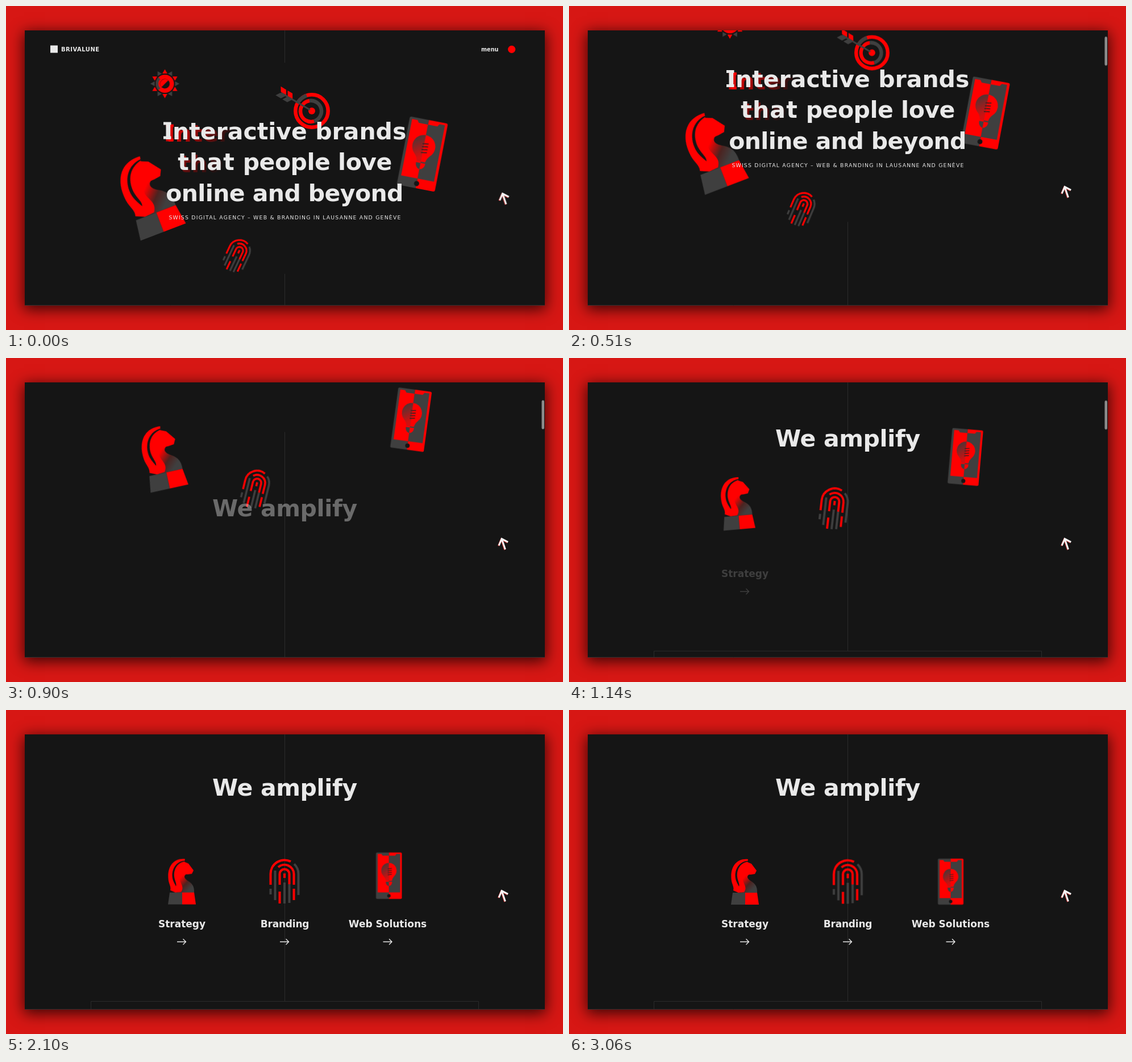
Write an HTML page that moves like this. It is 980x571 px and loops after 3090 ms.

```html
<!DOCTYPE html>
<html lang="en">
<head>
<meta charset="utf-8">
<title>Interactive brands</title>
<style>
  html, body { margin: 0; width: 100%; height: 100%; overflow: hidden; background: #d71714; }
  .card {
    position: absolute; left: 33px; top: 43px; width: 915px; height: 485px;
    background: #151515; box-shadow: 0 5px 24px 2px rgba(0, 0, 0, .72);
  }
  svg { position: absolute; left: 0; top: 0; display: block; }
  text { font-family: "DejaVu Sans", Verdana, sans-serif; font-weight: 700; fill: #e9e9e9; }
  .mid { text-anchor: middle; }
  .big { font-size: 41px; fill: #e9e9e9; }
  .sub { font-size: 9.3px; font-weight: 400; letter-spacing: 1.22px; }
  .label { font-size: 17px; }
  .ghost, .ghost text { fill: url(#ghost); }
  .rule { fill: none; stroke: #2b2b2b; }
  .red { fill: #f00; }
  .gray { fill: #3f3f3f; }
  .dark { fill: #151515; }
  .red-line { stroke: #f00; }
  .gray-line { stroke: #3f3f3f; }
  .line { fill: none; stroke-width: 4; }
  .ring { fill: none; stroke-width: 6.5; }

  .page, .icon, .drift, .title, .fade, .thumb, .bar, .cursor {
    animation: 3090ms linear infinite both;
  }

  .page { animation-name: scroll; }
  @keyframes scroll {
    0%, 9.71% { transform: translateY(0); animation-timing-function: cubic-bezier(.33, 0, .67, .62); }
    16.5% { transform: translateY(-91px); animation-timing-function: cubic-bezier(.33, .35, .67, .43); }
    23.3% { transform: translateY(-191px); animation-timing-function: cubic-bezier(.33, .47, .67, .98); }
    36.89% { transform: translateY(-447px); animation-timing-function: ease-out; }
    45%, 100% { transform: translateY(-450px); }
  }

  /* Each icon flies from its hero pose to its place above a label. */
  .icon { animation-name: fly; }
  @keyframes fly {
    0%, 9.71% { transform: var(--p0); animation-timing-function: cubic-bezier(.33, 0, .67, .33); }
    16.5% { transform: var(--p1); animation-timing-function: cubic-bezier(.33, .23, .67, .23); }
    23.3% { transform: var(--p2); animation-timing-function: cubic-bezier(.33, .18, .67, .83); }
    36.89% { transform: var(--p3); animation-timing-function: cubic-bezier(.33, .7, .67, .87); }
    49.51% { transform: var(--p4); animation-timing-function: cubic-bezier(.33, .7, .6, 1); }
    67.96% { transform: var(--p5); animation-timing-function: cubic-bezier(.2, .7, .5, 1); }
    99.03%, 100% { transform: var(--p6); }
  }
  .knight {
    --p0: translate(252.5px, 333px) rotate(-21deg) scale(1.74);
    --p1: translate(254.5px, 346px) rotate(-21deg) scale(1.69);
    --p2: translate(262px, 383.5px) rotate(-17.7deg) scale(1.56);
    --p3: translate(296.5px, 703px) rotate(-5deg) scale(1.147);
    --p4: translate(308.5px, 746px) rotate(-.8deg) scale(1.02);
    --p5: translate(310px, 752.6px) rotate(0deg) scale(1);
    --p6: translate(310px, 753px) rotate(0deg) scale(1);
  }
  .print {
    --p0: translate(406.5px, 440px) rotate(25deg) scale(.76);
    --p1: translate(409px, 449.5px) rotate(23deg) scale(.78);
    --p2: translate(419.5px, 472px) rotate(19deg) scale(.82);
    --p3: translate(466px, 712px) rotate(6.5deg) scale(.94);
    --p4: translate(485px, 743.5px) rotate(1.2deg) scale(.99);
    --p5: translate(490px, 752px) rotate(0deg) scale(1);
    --p6: translate(490.5px, 752.5px) rotate(0deg) scale(1);
  }
  .phone {
    --p0: translate(732.5px, 261px) rotate(11deg) scale(1.51);
    --p1: translate(732.5px, 280px) rotate(10.6deg) scale(1.47);
    --p2: translate(723.5px, 327px) rotate(9.8deg) scale(1.4);
    --p3: translate(697.5px, 621px) rotate(5deg) scale(1.21);
    --p4: translate(681.7px, 701.7px) rotate(1.5deg) scale(1.08);
    --p5: translate(673.7px, 742px) rotate(0deg) scale(1.01);
    --p6: translate(671.5px, 752.5px) rotate(0deg) scale(1);
  }

  .drift { animation-name: drift; }
  @keyframes drift {
    0%, 9.71% { transform: var(--from); animation-timing-function: cubic-bezier(.33, 0, .67, .5); }
    16.5% { transform: var(--to); }
    23.3%, 100% { transform: var(--out); }
  }
  .sun {
    --from: translate(279.5px, 137px);
    --to: translate(283px, 124px);
    --out: translate(289px, 100px);
  }
  .target {
    --from: translate(538px, 185px) scale(1);
    --to: translate(533px, 174px) scale(.97);
    --out: translate(524px, 152px) scale(.92);
  }

  .title { animation-name: rise; }
  @keyframes rise {
    0%, 27% { opacity: 0; transform: translateY(30px); animation-timing-function: ease-out; }
    35% { opacity: 1; transform: translateY(4px); animation-timing-function: ease-out; }
    42%, 100% { opacity: 1; transform: none; }
  }

  .fade1 { animation-name: fade1; }
  .fade2 { animation-name: fade2; }
  .fade3 { animation-name: fade3; }
  @keyframes fade1 { 0%, 35% { opacity: 0; } 44.7%, 100% { opacity: 1; } }
  @keyframes fade2 { 0%, 39.5% { opacity: 0; } 48.8%, 100% { opacity: 1; } }
  @keyframes fade3 { 0%, 45.8% { opacity: 0; } 55.6%, 100% { opacity: 1; } }

  .bar { animation-name: show; }
  @keyframes show {
    0%, 9.7% { opacity: 0; }
    11%, 54% { opacity: 1; }
    62%, 100% { opacity: 0; }
  }
  .thumb { animation-name: thumb; animation-timing-function: ease; }
  @keyframes thumb {
    0%, 10% { transform: translateY(0); }
    15%, 17.5% { transform: translateY(10.5px); }
    22.5%, 25% { transform: translateY(21.5px); }
    31%, 100% { transform: translateY(31.5px); }
  }

  .cursor { animation-name: point; animation-timing-function: ease-out; }
  @keyframes point {
    0% { transform: translate(1.5px, 12px); }
    8%, 100% { transform: none; }
  }
</style>
</head>
<body>
<div class="card"></div>
<svg width="980" height="571" viewBox="0 0 980 571">
  <defs>
    <clipPath id="view"><rect x="33" y="43" width="915" height="485"/></clipPath>
    <radialGradient id="ghost" gradientUnits="userSpaceOnUse" cx="268" cy="208" r="132">
      <stop offset="0" stop-color="#f00"/>
      <stop offset=".35" stop-color="#f00" stop-opacity=".65"/>
      <stop offset="1" stop-color="#f00" stop-opacity="0"/>
    </radialGradient>
    <linearGradient id="neck" gradientUnits="userSpaceOnUse" x1="-2" y1="-8" x2="16" y2="10">
      <stop offset="0" stop-color="#f00"/>
      <stop offset=".55" stop-color="#4c2320"/>
      <stop offset="1" stop-color="#3f3f3f"/>
    </linearGradient>
    <linearGradient id="glass" gradientUnits="userSpaceOnUse" x1="-13" y1="-18" x2="0" y2="2">
      <stop offset="0" stop-color="#4a3535"/>
      <stop offset="1" stop-color="#d01010"/>
    </linearGradient>
    <path id="arrow" d="M-8 0H7.5M2.5 -5L7.5 0L2.5 5" fill="none" stroke="#e9e9e9" stroke-width="1.3"/>
    <path id="pointer" d="M872.2 318.6L878.4 337.3M867.2 330.3L872.2 318.6L883.2 324.4" fill="none" stroke-width="3"/>
    <!-- slab ends of the capital I -->
    <path id="slabs" d="M277 204.5H290.5V209.5H277ZM277 229.5H290.5V234.5H277Z"/>
  </defs>

  <g clip-path="url(#view)">
    <g class="page">
      <path class="rule" d="M490.5 43V100M490.5 472V963M149.5 1020V963.5H831.5V1020"/>

      <rect x="78" y="69.5" width="13" height="13" fill="#e9e9e9"/>
      <text x="97" y="80" font-size="10" letter-spacing=".5">BRIVALUNE</text>
      <text x="836" y="80" font-size="9.7">menu</text>
      <circle class="red" cx="889.7" cy="76.3" r="6.6"/>

      <g class="drift sun">
        <g id="rays"></g>
        <circle class="red" r="16"/>
        <path class="gray" d="M-11.3 11.3A16 16 0 0 1 -11.3 -11.3L-8 -8A11.3 11.3 0 0 0 -8 8Z"/>
        <circle class="dark" r="8.5"/>
        <path class="red" d="M-6 6A8.5 8.5 0 0 1 6 -6Z"/>
      </g>

      <g class="drift target">
        <circle class="ring red-line" r="28.7"/>
        <path class="ring gray-line" d="M-24.4 -15A28.7 28.7 0 0 1 -9 -27.2"/>
        <path class="ring gray-line" d="M-4 -18A18.5 18.5 0 0 1 4 18"/>
        <path class="ring red-line" d="M4 18A18.5 18.5 0 1 1 -4 -18"/>
        <circle class="red" r="6"/>
        <path class="line gray-line" d="M-54 -32L-3 -2" style="stroke-width:3"/>
        <g transform="rotate(31)">
          <path class="red" d="M-64 -1L-69 -9H-58L-53 -1ZM-50 -1L-55 -9H-45L-40 -1Z"/>
          <path class="gray" d="M-64 1L-69 9H-58L-53 1ZM-50 1L-55 9H-45L-40 1Z"/>
        </g>
      </g>

      <g class="icon knight">
        <path fill="url(#neck)" d="M-8 18V-14H8C1 -10 4 -5 11 -1C19 4 21.5 10 21 19H-8Z"/>
        <path class="red" d="M5 -40C-15 -42 -26 -27 -24.5 -6C-24 4 -19 8 -21 15L-12 19L-2 18C5 8 -5 3 -4 -6C-3 -12 5 -13 10 -13L17 -14L20 -20L11 -32L4 -35Z"/>
        <path class="dark" d="M6 -36C-9 -34 -15 -22 -14 -9C-13 -1 -9 4 -11 8C-14 2 -17.5 -3 -17.5 -11C-17.5 -25 -9 -36 4 -37Z"/>
        <path class="gray" d="M-22 19H0V40H-25Z"/>
        <path class="red" d="M0 19H21L24 40H0Z"/>
      </g>

      <g class="icon print line">
        <path class="gray-line" d="M17 -30.6A24.5 24.5 0 0 1 24.5 -13V24M-24.5 13V23M-16.5 -19V33M8.5 5V38M0 2V39"/>
        <path class="red-line" d="M-24.5 6V-13A24.5 24.5 0 0 1 11 -35M-11 -25A16.5 16.5 0 0 1 16.5 -13V6M16.5 13V33M-8.5 6V-13A8.5 8.5 0 0 1 8.5 -13V5M-8.5 18V39M0 -14V-6"/>
      </g>

      <g class="icon phone">
        <path class="gray" d="M0 -40.5H-20.5Q-22.5 -40.5 -22.5 -38.5V38.5Q-22.5 40.5 -20.5 40.5H0Z"/>
        <path class="red" d="M0 -40.5H20.5Q22.5 -40.5 22.5 -38.5V38.5Q22.5 40.5 20.5 40.5H0Z"/>
        <path class="red" d="M0 -35H-11L-13 -38H-19.5V29H0Z"/>
        <path class="gray" d="M0 -35H11L13 -38H19.5V29H0Z"/>
        <circle class="dark" cy="35" r="3"/>
        <path fill="url(#glass)" d="M0 -22.5A13.5 13.5 0 0 0 -9 1Q-6 4 -5 9H0Z"/>
        <path class="red" d="M0 -22.5A13.5 13.5 0 0 1 9 1Q6 4 5 9H0Z"/>
        <path class="gray" d="M-5.5 10.5H0V18Q-5.5 17 -5.5 10.5Z"/>
        <path class="red" d="M5.5 10.5H0V18Q5.5 17 5.5 10.5Z"/>
        <path d="M-2 -12L5 -13M-2 -8.5L5 -9.5M-2 -5L5 -6M-2 -1.5L5 -2.5" stroke="#3a2020" stroke-width="1.2"/>
      </g>

      <g class="ghost big mid" transform="translate(4.5 4)">
        <use href="#slabs"/>
        <text x="491" y="234.5">Interactive brands</text>
        <text x="490.5" y="289" letter-spacing=".9" word-spacing="-7">that people love</text>
      </g>
      <g class="big mid">
        <use href="#slabs"/>
        <text x="491" y="234.5">Interactive brands</text>
        <text x="490.5" y="289"><tspan letter-spacing="1.2">that</tspan><tspan letter-spacing="-.5"> people love</tspan></text>
        <text x="490" y="343.5" letter-spacing="-.6">online and beyond</text>
      </g>
      <text class="sub mid" x="491" y="376">SWISS DIGITAL AGENCY – WEB &amp; BRANDING IN LAUSANNE AND GENÈVE</text>

      <text class="title big mid" x="490.5" y="601" letter-spacing="-.35">We amplify</text>
      <g class="fade fade1">
        <text class="label mid" x="309.5" y="833">Strategy</text>
        <use href="#arrow" x="309" y="858.5"/>
      </g>
      <g class="fade fade2">
        <text class="label mid" x="490.5" y="833" letter-spacing="-.2">Branding</text>
        <use href="#arrow" x="490" y="858.5"/>
      </g>
      <g class="fade fade3">
        <text class="label mid" x="671.5" y="833">Web Solutions</text>
        <use href="#arrow" x="671.5" y="858.5"/>
      </g>
    </g>

    <g class="bar"><rect class="thumb" x="942.5" y="43.5" width="4.5" height="51" rx="2.2" fill="#8c8c8c"/></g>
    <g class="cursor">
      <use href="#pointer" x="-.8" y=".8" stroke="#c33"/>
      <use href="#pointer" stroke="#f4f4f4"/>
    </g>
    <path d="M33 527.5H948" stroke="#3a3030"/>
  </g>
</svg>
<script>
  // Twelve rays of the sun, red and gray in turn.
  document.getElementById("rays").innerHTML = Array.from({ length: 12 }, (_, i) =>
    `<path class="${i % 2 ? "gray" : "red"}" d="M0 -25.5L4.3 -18H-4.3Z" transform="rotate(${i * 30})"/>`
  ).join("");
</script>
</body>
</html>
```
